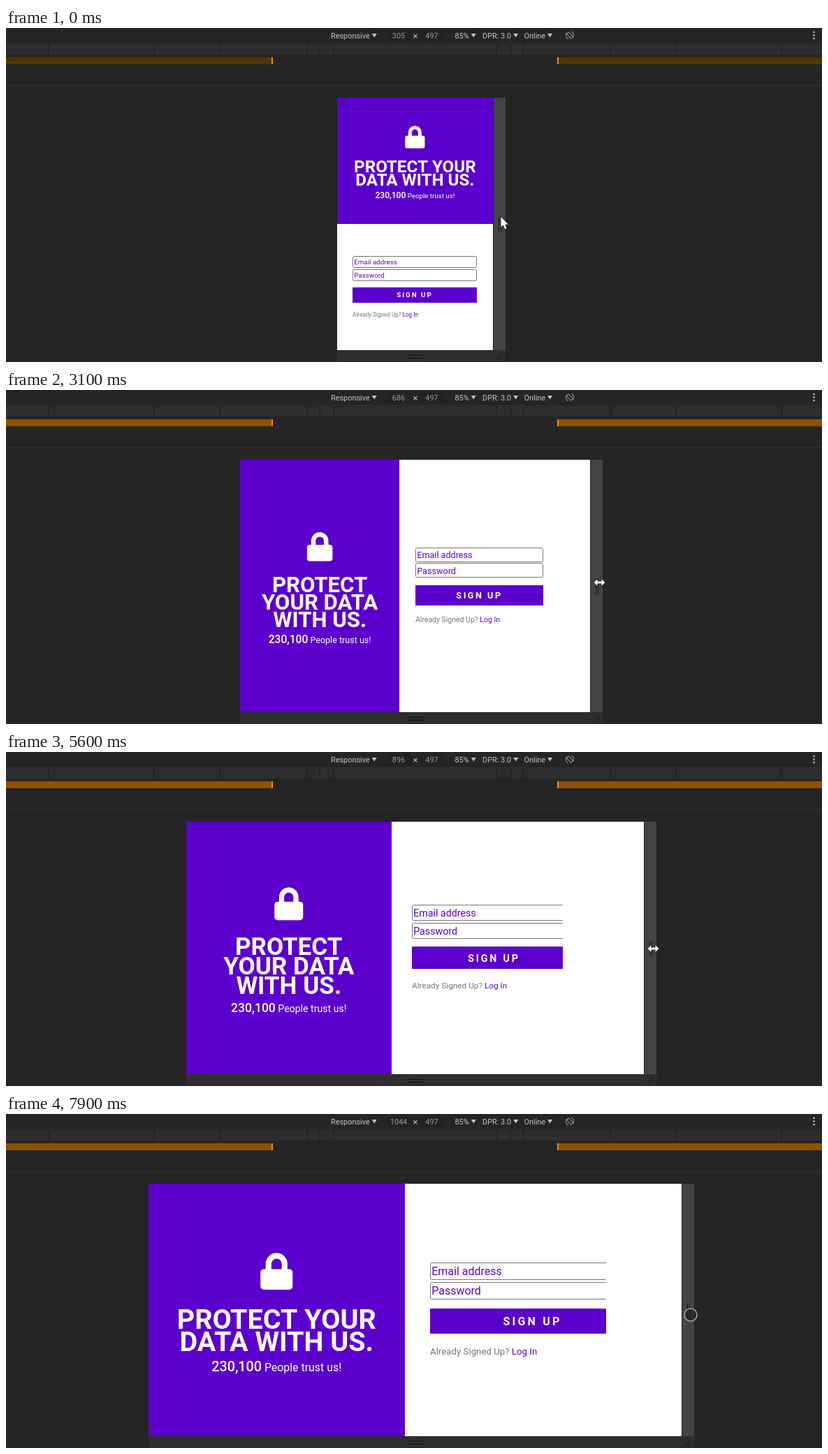
These frames come from a looping animation (1168x479 px, 8000 ms). An HTML page with a canvas:

```html
<!DOCTYPE html>
<html lang="en">
<head>
<meta charset="utf-8">
<title>Responsive sign-up page</title>
<style>
  html, body { margin: 0; width: 100%; height: 100%; overflow: hidden; background: #252525; }
  canvas { display: block; }
</style>
</head>
<body>
<canvas id="stage" width="1168" height="479"></canvas>
<script>
const ctx = document.getElementById('stage').getContext('2d');
const LOOP = 8000, ZOOM = 0.73, CENTER = 585.5, TOP = 100, BOTTOM = 462;
const MIN_WIDTH = 305, MAX_WIDTH = 1044, BREAKPOINT = 560;
const PURPLE = '#5b00cd';

// Each drag widens the viewport to `to` CSS pixels; the page layout trails behind, reaches
// `page` stage pixels at `settle`, and is painted no further than `limit`.
const drags = [
  { start: 700, end: 1400, settle: 2000, to: 478, page: 349, ease: 1, lag: 3.2 },
  { start: 2500, end: 3100, settle: 3700, to: 686, page: 501, ease: 1, lag: 0.5 },
  { start: 4000, end: 4800, settle: 5100, to: 896, page: 587, ease: 1.3, lag: 2.4, limit: 538.5 },
  { start: 5600, end: 6800, settle: 7600, to: MAX_WIDTH, page: 733, ease: 0.6, lag: 1.3, limit: 654.5 },
];

const progress = (t, start, end) => Math.min(1, (t - start) / (end - start));
const mix = (a, b, p) => a + (b - a) * p;

function stateAt(t) {
  let width = MIN_WIDTH, page = MIN_WIDTH * ZOOM, painted = page;
  for (const { start, end, settle, to, page: target, ease, lag, limit = Infinity } of drags) {
    if (t <= start) break;
    width = mix(width, to, progress(t, start, end) ** ease);
    // After release the layout repaints only twice.
    const pause = (settle - end) / 2;
    const repaint = t < end ? t : end + Math.floor((t - end) / pause) * pause;
    page = Math.min(width * ZOOM, mix(page, target, progress(repaint, start, settle) ** lag));
    painted = Math.min(page, limit);
  }
  return { width, page, painted };
}

function rect(x, y, w, h, color) {
  ctx.fillStyle = color;
  ctx.fillRect(x, y, w, h);
}

function line(x1, y1, x2, y2, color) {
  ctx.strokeStyle = color;
  ctx.lineWidth = 1;
  ctx.beginPath();
  ctx.moveTo(x1, y1);
  ctx.lineTo(x2, y2);
  ctx.stroke();
}

function polygon(x, y, points, color) {
  ctx.fillStyle = color;
  ctx.beginPath();
  points.forEach(([px, py]) => ctx.lineTo(x + px, y + py));
  ctx.closePath();
  ctx.fill();
}

// Text with its capitals centred on y; returns its width.
function text(str, x, y, size, color, weight = 400, align = 'left', spacing = 0) {
  ctx.font = `${weight} ${size}px Roboto, sans-serif`;
  ctx.letterSpacing = spacing + 'px';
  ctx.textAlign = align;
  ctx.fillStyle = color;
  ctx.fillText(str, x, y + size * 0.355);
  return ctx.measureText(str).width;
}

function drawToolbar(width) {
  const size = 10.9, light = '#c4c4c4', dim = '#9a9a9a';
  [['Responsive', 465], ['85%', 642.5], ['DPR: 3.0', 682], ['Online', 741.5]].forEach(([str, x]) => {
    const textWidth = text(str, x, 11, size, light);
    polygon(x + textWidth + 6.5, 8, [[-3.5, 0], [3.5, 0], [0, 5.5]], light);
  });
  rect(545, 4, 35, 14, '#222');
  rect(593, 4, 34, 14, '#222');
  text(Math.round(width), 562, 11, size, dim, 400, 'center');
  text('497', 609.5, 11, size, dim, 400, 'center');
  text('×', 586, 11.5, 13, light, 400, 'center');

  ctx.save();
  ctx.translate(807, 10.5);
  ctx.rotate(-Math.PI / 4);
  ctx.strokeStyle = dim;
  ctx.lineWidth = 1;
  ctx.strokeRect(-2, -4.5, 4, 9);
  for (const start of [-0.4, 2.74]) {
    ctx.beginPath();
    ctx.arc(0, 0, 5.6, start, start + 1.9);
    ctx.stroke();
  }
  ctx.restore();

  ctx.fillStyle = light;
  for (const y of [6, 10.5, 15]) {
    ctx.beginPath();
    ctx.arc(1156.5, y, 1.3, 0, 7);
    ctx.fill();
  }
}

function drawRulers(width) {
  line(0, 22.5, 1168, 22.5, '#333');
  rect(0, 24, 1168, 14, '#2e2e2e');
  const bar = width >= BREAKPOINT ? '#8f5000' : '#593200';
  const reach = BREAKPOINT * ZOOM / 2;
  for (const side of [-1, 1]) {
    for (const preset of [320, 375, 425, 768, 1024, 1440])
      rect(Math.round(CENTER + side * preset * 0.3645) - 0.5, 24, 1.5, 14, '#202020');
    const edge = Math.round(CENTER + side * reach);
    rect(side < 0 ? 0 : edge, 42, side < 0 ? edge : 1168 - edge, 10, bar);
    rect(edge - 1, 42, 2, 10, '#ff8410');
  }
  line(0, 82.5, 1168, 82.5, '#343434');
}

function drawLock(x, y, height) {
  ctx.save();
  ctx.translate(x, y);
  ctx.scale(height / 512, height / 512);
  ctx.fillStyle = ctx.strokeStyle = '#fff';
  ctx.beginPath();
  ctx.roundRect(-224, 224, 448, 288, 48);
  ctx.fill();
  ctx.lineWidth = 80;
  ctx.beginPath();
  ctx.moveTo(-112, 240);
  ctx.lineTo(-112, 152);
  ctx.arc(0, 152, 112, Math.PI, 0);
  ctx.lineTo(112, 240);
  ctx.stroke();
  ctx.restore();
}

function drawHero(left, width, height, page, lines) {
  rect(left, TOP, Math.round(width), height, PURPLE);
  const title = 17.52 + 0.03 * page, count = 8.76 + 0.015 * page, icon = 23.36 + 0.04 * page;
  const pitch = title * 0.8, center = left + width / 2;
  const total = icon + 1.975 * title + pitch * (lines.length - 1);
  let y = TOP + height / 2 - total / 2 - 0.5;
  drawLock(center, y, icon);
  y += icon + 1.06 * title;
  lines.forEach((str, i) => text(str, center, y + i * pitch, title, '#fff', 700, 'center'));
  y += pitch * (lines.length - 1) + 0.915 * title;

  const number = '230,100', claim = ' People trust us!', small = count * 0.805;
  ctx.letterSpacing = '0px';
  ctx.font = `500 ${count}px Roboto, sans-serif`;
  const numberWidth = ctx.measureText(number).width;
  ctx.font = `400 ${small}px Roboto, sans-serif`;
  const x = center - (numberWidth + ctx.measureText(claim).width) / 2;
  text(number, x, y, count, '#fff', 500);
  text(claim, x + numberWidth, y + (count - small) * 0.355, small, '#fff');
}

function drawField(label, x, y, width, height, size) {
  ctx.strokeStyle = '#767676';
  ctx.lineWidth = 1;
  ctx.beginPath();
  ctx.roundRect(x + 0.5, Math.round(y) + 0.5, width - 1, Math.round(height) - 1, 2);
  ctx.stroke();
  text(label, x + 2.2, y + height / 2 + 0.3, size, PURPLE);
}

function drawForm(panelLeft, panelWidth, panelCenter, page) {
  const size = 0.81 * (8.76 + 0.015 * page);
  const x = Math.round(panelLeft + panelWidth * 0.1), width = Math.round(panelWidth * 0.8);
  const field = 1.3 * size + 4.5, pitch = 1.5 * size + 4;
  const toButton = 1.95 * size + 6.8, button = 2.28 * size, toLogin = 1.4 * size + 3.2;
  let y = panelCenter - 0.27 * size - (pitch + toButton + button + toLogin) / 2;
  drawField('Email address', x, y, width, field, size);
  y += pitch;
  drawField('Password', x, y, width, field, size);
  y += toButton;
  rect(x, Math.round(y), width, Math.round(button), PURPLE);
  text('SIGN UP', x + width / 2, y + button / 2, size, '#fff', 700, 'center', size * 0.2);
  y += button + toLogin;
  const small = size * 0.83;
  const asked = text('Already Signed Up? ', x, y, small, '#757575');
  text('Log In', x + asked, y, small, PURPLE);
}

function drawDevice(left, right, page, painted) {
  const height = BOTTOM - TOP;
  rect(left, BOTTOM, right - left + 18, 16, '#2e2e2e');
  rect(right + 1, TOP, 17, height, '#444');
  for (const x of [8.5, 11.5]) line(right + x, 271, right + x, 293, '#161616');
  for (const y of [469.5, 473.5]) line(575, y, 597, y, '#111');
  line(right + 4, 476, right + 14, 466, '#111');
  line(right + 9, 476, right + 14, 471, '#111');

  rect(left, TOP, right - left, height, '#fff');
  ctx.save();
  ctx.beginPath();
  ctx.rect(left, TOP, Math.min(Math.round(painted), right - left), height);
  ctx.clip();
  const twoLines = ['PROTECT YOUR', 'DATA WITH US.'];
  if (page < BREAKPOINT * ZOOM) {
    const heroHeight = height / 2;
    drawHero(left, page, heroHeight, page, twoLines);
    drawForm(left, page, TOP + heroHeight * 1.5, page);
  } else {
    const half = page / 2;
    drawHero(left, half, height, page, half > 345 ? twoLines : ['PROTECT', 'YOUR DATA', 'WITH US.']);
    drawForm(left + half, half, TOP + height / 2, page);
  }
  ctx.restore();
}

function drawPointer(t, x, y) {
  ctx.strokeStyle = '#111';
  ctx.lineWidth = 1.6;
  ctx.lineJoin = 'round';
  if (t < 100) {
    polygon(x - 2, y - 1, [[0, 0], [0, 14.5], [3.2, 11.6], [5.6, 17.4], [8.2, 16.3], [5.8, 10.7], [10.2, 10.5]], '#fff');
    ctx.stroke();
    ctx.fill();
  } else if (t >= 7900) {
    ctx.fillStyle = 'rgba(30, 30, 30, .55)';
    ctx.strokeStyle = '#a0a0a0';
    ctx.beginPath();
    ctx.arc(x - 0.5, y, 9, 0, 7);
    ctx.fill();
    ctx.stroke();
  } else {
    const half = [[-8, 0], [-3, -5], [-3, -1.5], [3, -1.5], [3, -5]];
    polygon(x, y, [...half, ...half.map(([px, py]) => [-px, -py])], '#fff');
    ctx.stroke();
    ctx.fill();
  }
}

function draw(now) {
  const t = Math.floor(now % LOOP / 100) * 100;
  const { width, page, painted } = stateAt(t);
  const left = Math.round(CENTER - width * ZOOM / 2), right = Math.round(CENTER + width * ZOOM / 2);
  const opened = progress(width, MIN_WIDTH, MAX_WIDTH);
  rect(0, 0, 1168, 479, '#252525');
  drawToolbar(width);
  drawRulers(width);
  drawDevice(left, right, page, painted);
  drawPointer(t, right + 13.5, Math.round(272 + 16 * opened ** 2));
}

let start;
function tick(now) {
  start ??= now;
  draw(now - start);
  requestAnimationFrame(tick);
}
requestAnimationFrame(tick);
</script>
</body>
</html>
```
